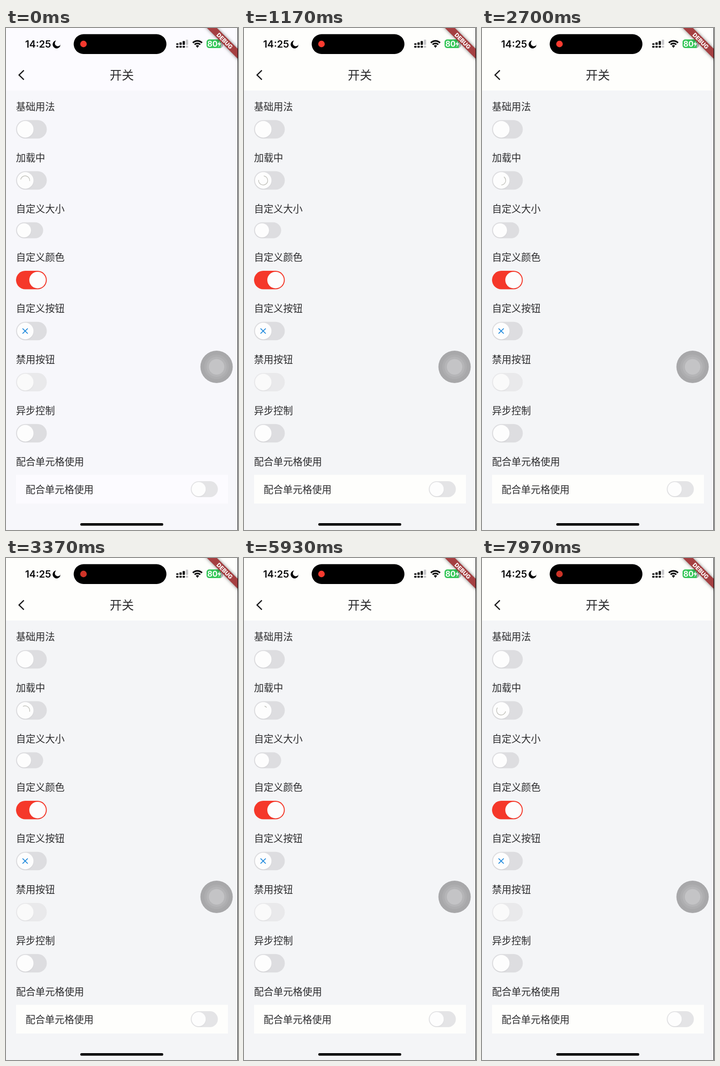
Write an HTML page with a canvas that moves like this. It is 509 by 1100 pixels and loops after 8 s.

```html
<!DOCTYPE html>
<html lang="zh-CN">
<head>
<meta charset="utf-8">
<title>开关</title>
<style>
html, body { margin: 0; width: 100%; height: 100%; overflow: hidden; background: #f4f5f7; }
canvas { display: block; width: 509px; height: 1100px; }
</style>
</head>
<body>
<canvas id="stage" width="509" height="1100"></canvas>
<script>
const ctx = document.getElementById('stage').getContext('2d');
const LOOP = 8000, TAU = Math.PI * 2;
const CJK = '"Noto Sans CJK SC", "Noto Sans CJK", sans-serif';
const LATIN = 'Inter, sans-serif';
const INK = '#2b2b2d', BLACK = '#08080a';
const GREY = [221, 221, 224], PALE = [228, 228, 230], FADED = [233, 233, 235];
const BLUE = [22, 130, 252], RED = [245, 56, 42];

const clamp = v => Math.min(1, Math.max(0, v));
const mix = (a, b, k) => a.map((v, i) => v + (b[i] - v) * k);
const rgb = c => `rgb(${c.map(Math.round).join(',')})`;
const easeInOut = u => u < .5 ? 4 * u ** 3 : 1 - 4 * (1 - u) ** 3;
const ramp = (t, start) => easeInOut(clamp((t - start) / 300));
const pulse = (t, on, off) => ramp(t, on) - ramp(t, off);

function box(x, y, w, h, r, fill) {
  ctx.fillStyle = fill;
  ctx.beginPath();
  ctx.roundRect(x, y, w, h, r);
  ctx.fill();
}

function disc(x, y, r, fill) {
  ctx.fillStyle = fill;
  ctx.beginPath();
  ctx.arc(x, y, r, 0, TAU);
  ctx.fill();
}

function line(points, width, color) {
  ctx.strokeStyle = color;
  ctx.lineWidth = width;
  ctx.beginPath();
  points.forEach(([x, y]) => ctx.lineTo(x, y));
  ctx.stroke();
}

function text(str, x, y, font, color = INK, align = 'left') {
  ctx.font = font;
  ctx.fillStyle = color;
  ctx.textAlign = align;
  ctx.fillText(str, x, y);
}

// Cubic bezier (0.4, 0, 0.2, 1)
function fastOutSlowIn(x) {
  let lo = 0, hi = 1;
  for (let i = 0; i < 20; i++) {
    const s = (lo + hi) / 2, q = 1 - s;
    if (1.2 * q * q * s + .6 * q * s * s + s ** 3 < x) lo = s; else hi = s;
  }
  return lo * lo * (3 - 2 * lo);
}

function spinner(t, x, y) {
  const phase = (t + 861) / 1333 % 1;
  const head = fastOutSlowIn(clamp(phase * 2)) * 270;
  const tail = fastOutSlowIn(clamp(phase * 2 - 1)) * 270;
  const turn = 129 + t / 2222 * 360;
  const start = (turn - 90 + tail + phase * 90) * Math.PI / 180;
  const sweep = Math.max(head - tail, .1) * Math.PI / 180;
  ctx.strokeStyle = '#bfbfb8';
  ctx.lineWidth = 1.4;
  ctx.beginPath();
  ctx.arc(x, y, 10, start, start + sweep);
  ctx.stroke();
}

function toggle(x, cy, w, h, { value = 0, on = BLUE, off = GREY, knob = '#fdfdfd' } = {}) {
  const kx = x + h / 2 + (w - h) * value;
  box(x, cy - h / 2, w, h, h / 2, rgb(mix(off, on, value)));
  ctx.save();
  ctx.beginPath();
  ctx.roundRect(x, cy - h / 2, w, h, h / 2);
  ctx.clip();
  ctx.shadowColor = 'rgba(0,0,0,.04)';
  ctx.shadowBlur = 3;
  ctx.shadowOffsetY = 2;
  disc(kx, cy, h / 2 - 2.1, knob);
  ctx.restore();
}

const largeToggle = (cy, look) => toggle(22, cy, 67.5, 40.5, look);
const smallToggle = (x, cy, look) => toggle(x, cy, 59.5, 35, look);

function statusBar(t) {
  text('14:25', 42, 42.5, `600 21.5px ${LATIN}`, BLACK);

  ctx.beginPath();
  ctx.arc(111, 36, 8.7, -.25, Math.PI * 1.5 - .15);
  ctx.quadraticCurveTo(105, 33, 109, 38);
  ctx.quadraticCurveTo(114, 42, 119.4, 37.5);
  ctx.fillStyle = BLACK;
  ctx.fill();

  box(148.5, 13.5, 203.5, 43.5, 21.75, '#000');
  const glow = .5 - .5 * Math.cos((t - 2020) / 1500 * TAU);
  disc(170, 35, 7.2, rgb(mix([203, 51, 39], [255, 59, 48], glow)));

  [3.5, 5.5, 8.5, 11.5].forEach((h, i) => {
    const color = i < 3 ? BLACK : '#c6c6c9', x = 373.5 + i * 7;
    box(x, 37 - h, 5, h, 1.3, color);
    box(x, 39, 5, 4.2, 1.3, color);
  });

  for (const [r, w] of [[14.2, 3.6], [8.8, 3.4]]) {
    ctx.strokeStyle = BLACK;
    ctx.lineWidth = w;
    ctx.beginPath();
    ctx.arc(420, 42.5, r, -Math.PI * .75, -Math.PI * .25);
    ctx.stroke();
  }
  ctx.fillStyle = BLACK;
  ctx.beginPath();
  ctx.moveTo(420, 43.5);
  ctx.arc(420, 42.5, 5, -Math.PI * .75, -Math.PI * .25);
  ctx.fill();

  box(440, 25, 36, 19, 6, '#b4b4b8');
  box(440, 25, 31, 19, [6, 0, 0, 6], '#35c759');
  text('80', 453, 41, `700 17px ${LATIN}`, '#fff', 'center');
  ctx.fillStyle = '#fff';
  ctx.beginPath();
  [[469.5, 28], [464, 36], [467.5, 36], [466, 42], [472, 33.5], [468.5, 33.5]]
    .forEach(([x, y]) => ctx.lineTo(x, y));
  ctx.fill();
}

function debugBanner() {
  ctx.save();
  ctx.translate(508, 0);
  ctx.rotate(Math.PI / 4);
  ctx.shadowColor = 'rgba(0,0,0,.5)';
  ctx.shadowBlur = 7;
  ctx.fillStyle = '#a54042';
  ctx.fillRect(-60, 32, 120, 15.4);
  ctx.shadowColor = 'transparent';
  text('DEBUG', 0, 44.5, `800 12.6px ${LATIN}`, '#fff', 'center');
  ctx.restore();
}

function floatingButton() {
  disc(462, 742.5, 35.5, '#a8a8aa');
  disc(462, 742.5, 27, '#aeaeb0');
  disc(462, 742.5, 22, '#b5b5b7');
  disc(462, 742.5, 17, '#c4c4c6');
}

const labels = [
  ['基础用法', 172], ['加载中', 284], ['自定义大小', 396], ['自定义颜色', 502],
  ['自定义按钮', 614], ['禁用按钮', 726], ['异步控制', 838], ['配合单元格使用', 950]
];

function draw(t) {
  const settle = clamp(t / 1000);
  const paper = rgb(mix([252, 251, 255], [254, 254, 252], settle));
  ctx.fillStyle = rgb(mix([247, 247, 251], [244, 245, 247], settle));
  ctx.fillRect(0, 0, 509, 1100);
  ctx.fillStyle = paper;
  ctx.fillRect(0, 0, 509, 137);

  statusBar(t);
  line([[39.2, 92.8], [28.6, 103], [39.2, 113.2]], 2.6, '#1c1c1e');
  text('开关', 254, 113, `350 26.6px ${CJK}`, INK, 'center');

  const labelFont = `350 21.3px ${CJK}`;
  for (const [label, y] of labels) text(label, 22, y + 8, labelFont);

  largeToggle(222, { value: pulse(t, 1290, 1932) });
  largeToggle(334);
  spinner(t, 42, 334);
  smallToggle(22, 443.3, { value: pulse(t, 3900, 5100) });
  largeToggle(552.3, { value: 1 - pulse(t, 6450, 7150), on: RED });
  largeToggle(664);
  line([[36.3, 658.3], [47.7, 669.7]], 1.8, '#1b87dc');
  line([[47.7, 658.3], [36.3, 669.7]], 1.8, '#1b87dc');
  largeToggle(776, { off: FADED, knob: '#fafafa' });
  largeToggle(888);

  box(22, 979, 465, 63, 0, paper);
  text('配合单元格使用', 43, 1019, labelFont);
  smallToggle(405.3, 1010.5, { off: PALE });

  floatingButton();
  box(163, 1085, 182, 5.6, 2.8, '#000');
  debugBanner();
  ctx.fillStyle = '#000';
  ctx.fillRect(508, 0, 1, 1100);
}

const origin = performance.now();
function tick() {
  draw((performance.now() - origin) % LOOP);
  requestAnimationFrame(tick);
}
tick();
</script>
</body>
</html>
```
